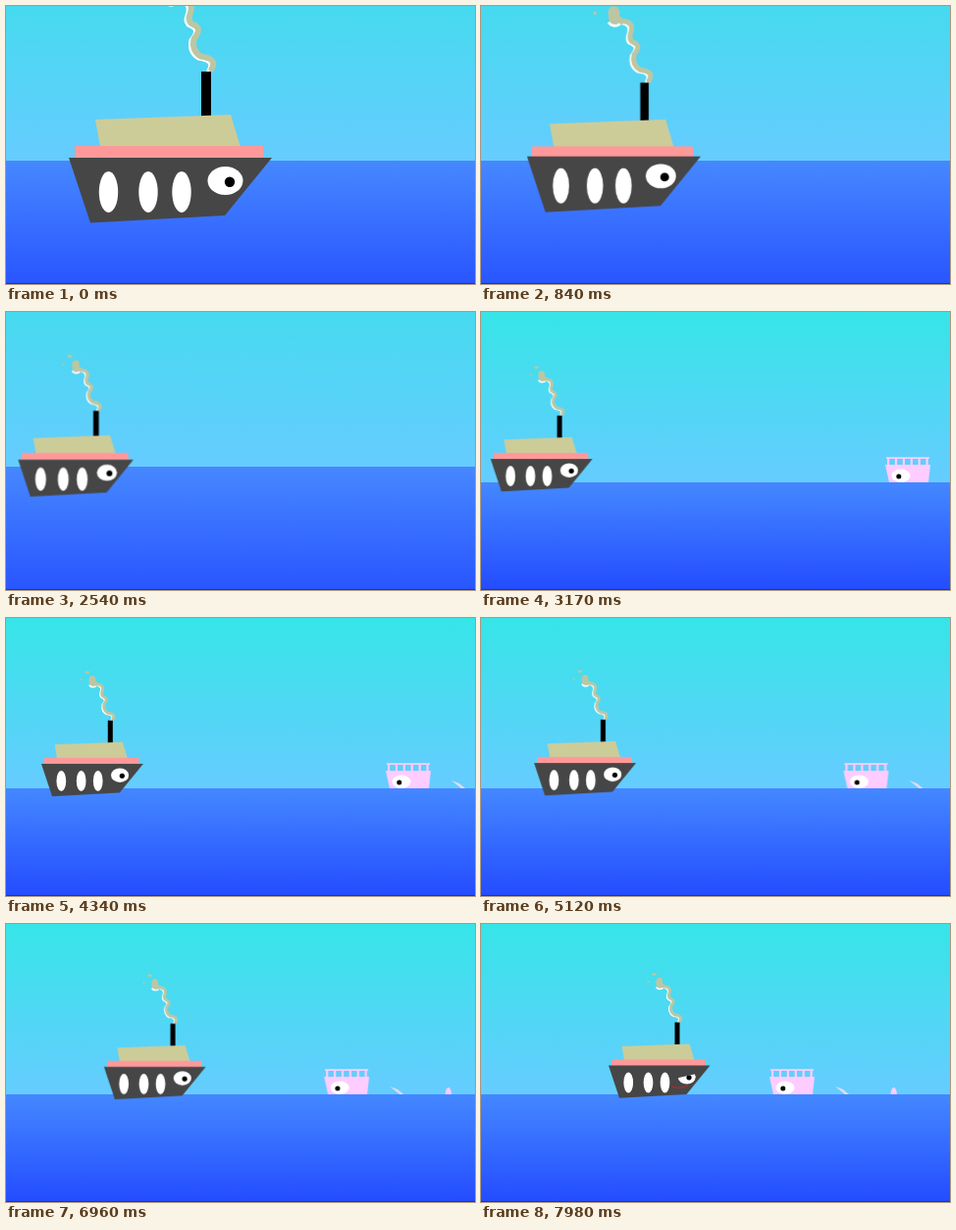
An HTML page that plays this animation: 478x284 px, repeating every 8000 ms.

```html
<!DOCTYPE html>
<html lang="en">
<head>
<meta charset="utf-8">
<title>Steamer</title>
<style>
  html, body { margin: 0; width: 100%; height: 100%; overflow: hidden; }
  svg { display: block; width: 478px; height: 284px; }

  #ship, #fleet, #near, #far, #scowl { animation: 8s step-end infinite; }
  #ship  { animation-name: sail; }
  #fleet { animation-name: approach; }
  #near  { animation-name: until-cut; }
  #far   { animation-name: after-cut; }
  #scowl { animation-name: frown; }

  /* Each leg advances in steps of about 78 ms. */
  @keyframes sail {
    0%     { transform: translate(64px, 155px) scale(1); animation-timing-function: steps(38); }
    36.25% { transform: translate(4.5px, 150.2px) scale(.502); animation-timing-function: steps(18); }
    54.25% { transform: translate(36px, 148.8px) scale(.502); animation-timing-function: steps(21); }
    74.5%  { transform: translate(74px, 147px) scale(.502); animation-timing-function: steps(26); }
    99.75%, 100% { transform: translate(130px, 144.5px) scale(.5); }
  }
  @keyframes approach {
    0%     { transform: translateX(417px); }
    36.25% { transform: translateX(417px); animation-timing-function: steps(18); }
    54.25% { transform: translateX(387px); animation-timing-function: steps(21); }
    74.5%  { transform: translateX(350px); animation-timing-function: steps(26); }
    99.75%, 100% { transform: translateX(294px); }
  }
  @keyframes until-cut { 0% { visibility: visible; } 36.25%, 100% { visibility: hidden; } }
  @keyframes after-cut { 0% { visibility: hidden; } 36.25%, 100% { visibility: visible; } }
  @keyframes frown     { 0% { visibility: hidden; } 87.5%, 100% { visibility: visible; } }
</style>
</head>
<body>
<svg viewBox="0 0 478 284">
  <defs>
    <linearGradient id="skyNear" x2="0" y2="1"><stop stop-color="#46daef"/><stop offset="1" stop-color="#66ccff"/></linearGradient>
    <linearGradient id="seaNear" x2="0" y2="1"><stop stop-color="#4688ff"/><stop offset="1" stop-color="#2955ff"/></linearGradient>
    <linearGradient id="skyFar" x2="0" y2="1"><stop stop-color="#36e5e8"/><stop offset="1" stop-color="#66ccff"/></linearGradient>
    <linearGradient id="seaFar" x2="0" y2="1"><stop stop-color="#4488ff"/><stop offset="1" stop-color="#244cff"/></linearGradient>
    <path id="plume" d="M143 -89C149 -99 139 -101 132 -102C124 -107 124 -115 125 -120C132 -129 131 -132 122 -136C116 -143 126 -148 121 -156C115 -163 108 -157 104 -164"/>
  </defs>

  <g id="near">
    <rect width="478" height="158" fill="url(#skyNear)"/>
    <rect y="158" width="478" height="126" fill="url(#seaNear)"/>
  </g>

  <g id="far">
    <rect width="478" height="174" fill="url(#skyFar)"/>
    <rect y="174" width="478" height="110" fill="url(#seaFar)"/>
    <g id="fleet" fill="#ffccff">
      <path d="M0 156H46L44 174H4Z"/>
      <path d="M1 149.2H45" stroke="#ffccff" stroke-width="1.8"/>
      <path d="M2 153H45" stroke="#ffccff" stroke-width="6.5" stroke-dasharray="2.2 5.7"/>
      <ellipse cx="16" cy="167.3" rx="9.5" ry="6.7" fill="#fff"/>
      <circle cx="13.8" cy="168" r="2.5" fill="#000"/>
      <path d="M67 166L75 169L81 174H77Z" fill="#e2dcf2"/>
      <path d="M123.5 174Q124 167 127 167Q129.5 168 130 174Z"/>
    </g>
  </g>

  <rect y="283" width="478" height="1" fill="#20398c"/>

  <!-- Local origin: top left corner of the hull -->
  <g id="ship">
    <g fill="none" stroke-linecap="round" stroke-linejoin="round">
      <use href="#plume" stroke="#fff" stroke-width="5"/>
      <use href="#plume" x="2.5" y="-1.5" stroke="#bdc6a2" stroke-width="6"/>
    </g>
    <path d="M98 -162Q94 -175 101 -179Q112 -181 110 -168Q118 -163 114 -158Q101 -153 98 -162Z" fill="#bdc6a2"/>
    <path d="M97 -160Q102 -153 111 -158" fill="none" stroke="#fff" stroke-width="3"/>
    <ellipse cx="93" cy="-186" rx="5" ry="2.5" fill="#bdc6a2"/>
    <circle cx="81" cy="-171" r="2" fill="#bdc6a2"/>

    <rect x="135" y="-88" width="10" height="46" fill="#000"/>
    <path d="M27 -39L165 -44L175 -11H32Z" fill="#cccc99"/>
    <rect x="6" y="-12" width="192" height="12.5" fill="#ff9999"/>
    <path d="M0 0H207L159 59L22 66.5Z" fill="#464646"/>
    <g fill="#fff">
      <ellipse cx="40.5" cy="35" rx="9.7" ry="21"/>
      <ellipse cx="81" cy="35" rx="9.7" ry="21"/>
      <ellipse cx="115" cy="35" rx="9.7" ry="21"/>
      <ellipse cx="159.5" cy="23.5" rx="18" ry="14.5"/>
    </g>
    <circle cx="164" cy="24.7" r="5.2" fill="#000"/>
    <g id="scowl">
      <path d="M138 5H182L179 17L139 26Z" fill="#464646"/>
      <path d="M128 43Q150 49 161 41" fill="none" stroke="#a03030" stroke-width="3"/>
    </g>
  </g>
</svg>
</body>
</html>
```
